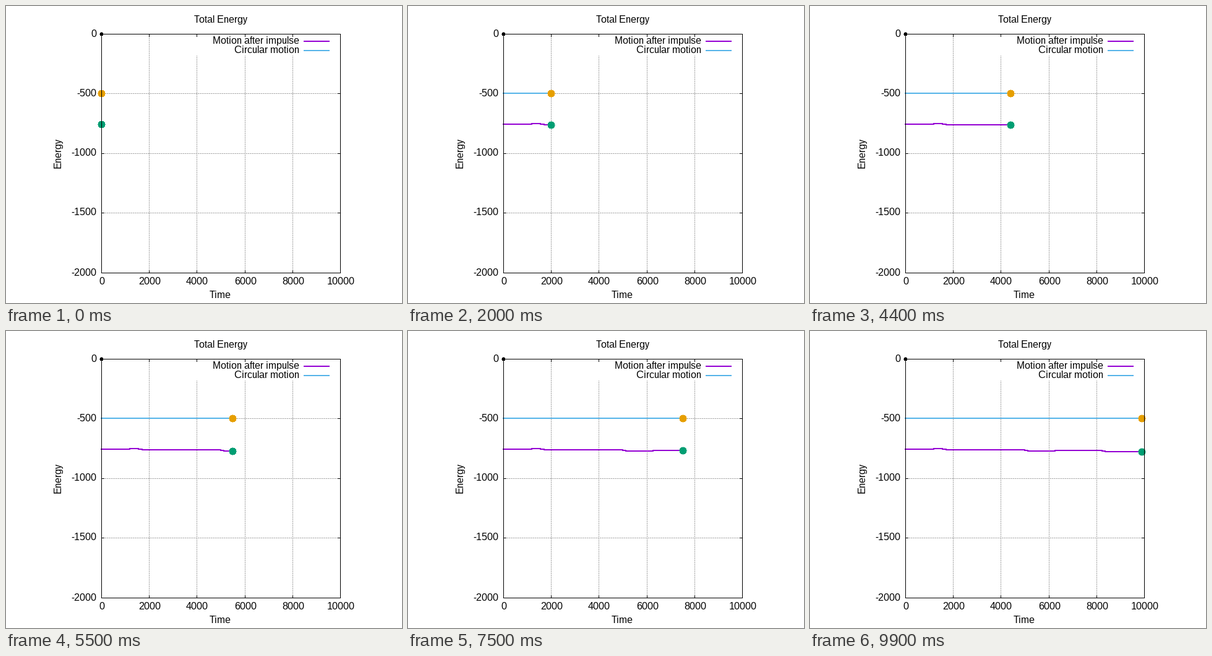
A matplotlib script for the animation above (10 s loop, 640x480 px).

```python
import numpy as np
import matplotlib.pyplot as plt
from matplotlib.animation import FuncAnimation
from matplotlib.patches import Polygon

W, H, DPI = 640, 480, 100
PX = 72 / DPI
LEFT, TOP, SIZE = 154, 45, 386
RIGHT, BOTTOM = LEFT + SIZE, TOP + SIZE
PURPLE, BLUE, GREEN, ORANGE = "#9400d3", "#56b4e9", "#009e73", "#e69f00"
FRAMES, INTERVAL = 100, 100

plt.rcParams.update({
    "font.family": "Liberation Sans",
    "font.size": 16 * PX,
    "text.hinting": "default",
    "text.hinting_factor": 1,
})

# Data units are pixels, whole numbers being pixel centres
fig = plt.figure(figsize=(W / DPI, H / DPI), dpi=DPI, facecolor="white")
ax = fig.add_axes([0, 0, 1, 1])
ax.set_xlim(-0.5, W - 0.5)
ax.set_ylim(H - 0.5, -0.5)
ax.axis("off")


def line(xs, ys, color="black", width=1, z=1, **kw):
    kw.setdefault("solid_capstyle", "butt")
    return ax.plot(xs, ys, color=color, lw=width * PX, zorder=z,
                   antialiased=False, snap=False, **kw)[0]


def label(x, y, text, ha="center", **kw):
    ax.text(x, y, text, ha=ha, va="baseline", zorder=3, **kw)


def disc(r):
    """Outline of a disc whose points are cut to whole pixels."""
    a = np.radians(np.arange(360))
    circle = np.column_stack([np.cos(a), np.sin(a)])
    return np.trunc(r * circle + 1e-9 * np.sign(circle))


def dot(x, y, r, color, z=6):
    return ax.add_patch(Polygon(disc(r) + (x, y), fc=color, ec=color, lw=PX,
                                joinstyle="round", zorder=z, snap=False,
                                antialiased=False))


def to_x(t):
    return int(np.floor(LEFT + 0.05 + t * SIZE / 10000 + 0.5))


# Grid, ticks and tick labels
dotted = dict(color="#a0a0a0", z=0, linestyle=(0, (2, 2)), dash_capstyle="butt")
for i in range(6):
    x = to_x(2000 * i)
    label(x + 0.5, 450, str(2000 * i))
    if 0 < i < 5:
        line([x, x], [BOTTOM + 0.5, TOP if i == 1 else 80], **dotted)
        line([x, x], [TOP, TOP + 4.5])
        line([x, x], [BOTTOM, BOTTOM - 4.5])
for i in range(5):
    y = TOP + SIZE * i // 4
    label(145.5, y + 4, str(-500 * i), ha="right")
    if 0 < i < 4:
        line([LEFT - 0.5, RIGHT], [y, y], **dotted)
        line([LEFT, LEFT + 4.5], [y, y])
        line([RIGHT, RIGHT - 4.5], [y, y])

line([LEFT, RIGHT, RIGHT, LEFT, LEFT], [TOP, TOP, BOTTOM, BOTTOM, TOP], z=8,
     solid_joinstyle="miter", solid_capstyle="projecting")

label(346, 27, "Total Energy")
label(345.5, 472, "Time")
label(88.5, 237.5, "Energy", rotation=90, rotation_mode="anchor")

# Legend
for y, text, color in ((57, "Motion after impulse", PURPLE),
                       (72, "Circular motion", BLUE)):
    label(473.5, y + 4, text, ha="right")
    line([480.5, 522.5], [y - 0.5, y - 0.5], color, 2)

# Energy after the impulse: (start x, level) of each plateau
STEPS = [(153, 191), (200, 190), (214, 191), (220, 192), (347, 193),
         (352, 194), (396, 193), (472, 194), (477, 195)]
step_x, step_y = np.array(STEPS).T
ORBIT_Y = 141


def level(x):
    return step_y[np.searchsorted(step_x, x, side="right") - 1]


orbit = line([], [], BLUE, 2, z=4)
impulse = line([], [], PURPLE, 2, z=4, drawstyle="steps-post")
orbit_dot = dot(LEFT, ORBIT_Y, 6, ORANGE)
impulse_dot = dot(LEFT, level(LEFT), 6, GREEN)
dot(LEFT, TOP, 3, "black", z=7)
DISC = disc(6)


def update(i):
    x = to_x(100 * i)
    y = level(x)
    past = step_x < x
    impulse.set_data(np.append(step_x[past], x) - 0.5,
                     np.append(step_y[past], y) - 0.5)
    orbit.set_data([LEFT - 1.5, x], [ORBIT_Y - 0.5] * 2)
    orbit_dot.set_xy(DISC + (x, ORBIT_Y))
    impulse_dot.set_xy(DISC + (x, y))
    return orbit, impulse, orbit_dot, impulse_dot


anim = FuncAnimation(fig, update, frames=FRAMES, interval=INTERVAL,
                     init_func=lambda: update(0), repeat=True,
                     repeat_delay=0, blit=False)
plt.show()
```
